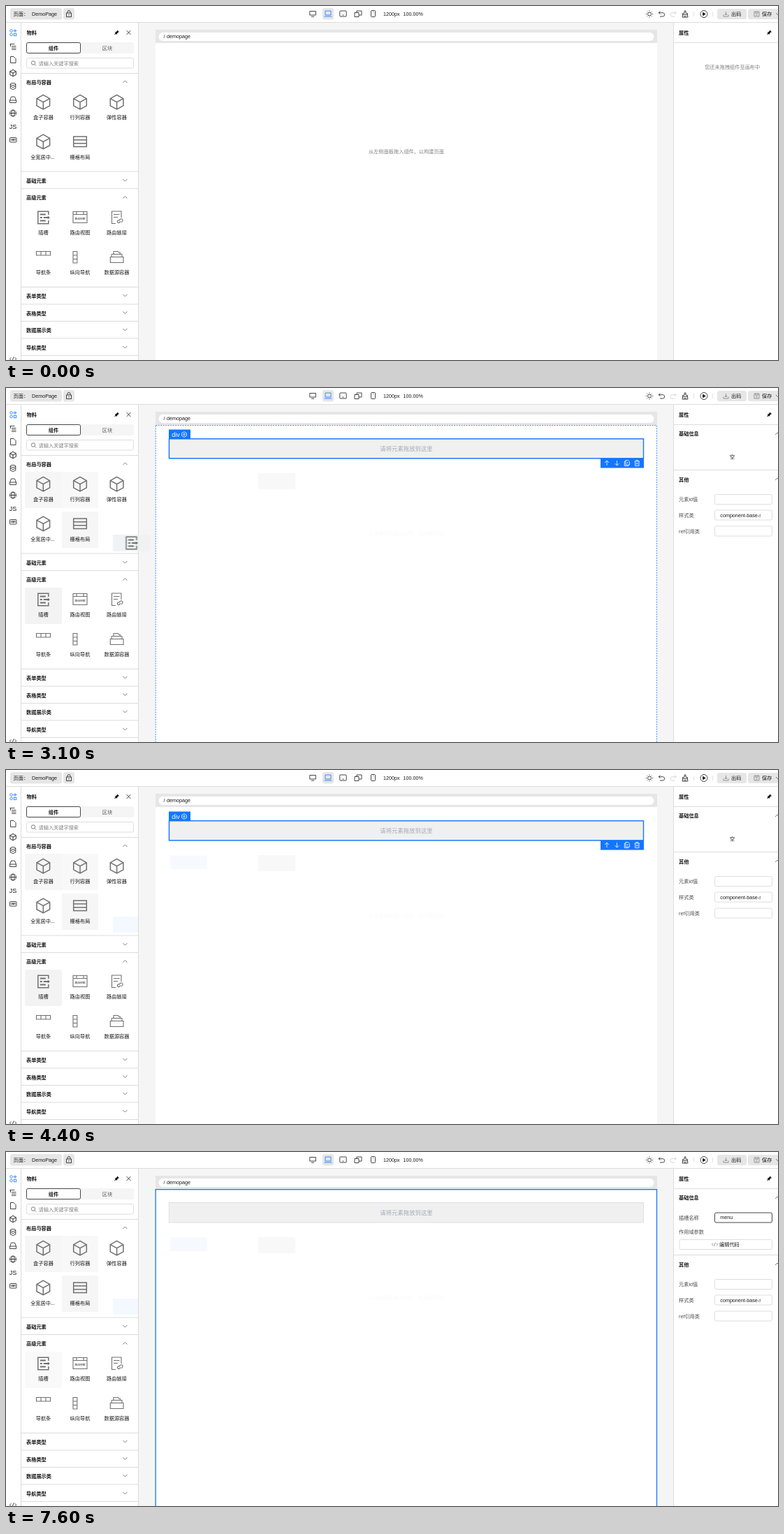
Write an HTML page that moves like this. It is 1105 px wide and 507 px high and loops after 8000 ms.

```html
<!DOCTYPE html>
<html lang="zh-CN">
<head>
<meta charset="utf-8">
<title>页面设计器</title>
<style>
html, body { margin: 0; width: 100%; height: 100%; overflow: hidden; background: #fff; }
svg.stage { display: block; width: 100%; height: 100%; }
text { font: 7.2px "Liberation Sans", "Noto Sans CJK SC", "Noto Sans CJK", sans-serif; fill: #191919; white-space: pre; }
.b text, text.b { font-weight: 700; }
.m text, text.m { text-anchor: middle; }
.soft text, text.soft { fill: #808080; }
.label text { fill: #4d4d4d; }
.white text, text.white { fill: #fff; }
.line { stroke: #191919; fill: none; stroke-width: .8; }
.tile { stroke: #707070; fill: none; stroke-width: 1.5; }
.thin { stroke-width: 1.1; }
.rule { stroke: #dcdcdc; fill: none; }
.box { fill: #fff; stroke: #d6d6d6; stroke-width: .8; }
.btn { fill: #e6e6e6; }
.blue { fill: #1476ff; }
.edge { fill: none; stroke: #1476ff; }
.dash { stroke-dasharray: 2 1.5; }
.chev { stroke: #707070; fill: none; stroke-width: .9; }

[class*="t-"] { animation: 8s step-end infinite; }
.t-empty { animation-name: empty; }
.t-hint { animation-name: hint; }
.t-box { animation-name: box; }
.t-row { animation-name: row; }
.t-pick { animation-name: pick; }
.t-slot { animation-name: slot; }
.t-added { animation-name: added; }
.t-sel { animation-name: sel; }
.t-full { animation-name: full; }
.t-into { animation-name: into; }
.t-bar { animation-name: bar; }
.t-under { animation-name: under; }
.t-near { animation-name: near; }
.t-done { animation-name: done; }
.t-shift { animation-name: shift; }
.t-drag1 { animation-name: drag1; }
.t-drag2 { animation-name: drag2; }
.t-focus { animation-name: focus; }
.t-caret { animation-name: caret; }
.t-k1 { animation-name: k1; }
.t-k2 { animation-name: k2; }
.t-k3 { animation-name: k3; }
.t-k4 { animation-name: k4; }

@keyframes empty { 0% { visibility: visible } 21.25%, 100% { visibility: hidden } }
@keyframes hint { 0% { opacity: 1 } 21.25%, 100% { opacity: .05 } }
@keyframes box { 0% { visibility: hidden } 6.25%, 100% { visibility: visible } }
@keyframes row { 0% { visibility: hidden } 12.5%, 100% { visibility: visible } }
@keyframes pick { 0% { visibility: hidden } 38.75%, 100% { visibility: visible } }
@keyframes slot { 0% { fill: #fff } 38.75% { fill: #f3f3f3 } 56.25%, 100% { fill: #f9f9f9 } }
@keyframes added { 0% { visibility: hidden } 21.25%, 100% { visibility: visible } }
@keyframes sel { 0% { visibility: hidden } 21.25% { visibility: visible } 56.25%, 100% { visibility: hidden } }
@keyframes full { 0% { visibility: hidden } 21.25% { visibility: visible } 42.5%, 100% { visibility: hidden } }
@keyframes into {
  0% { visibility: hidden } 42.5% { visibility: visible } 46.25% { visibility: hidden }
  62.5% { visibility: visible } 63.75%, 100% { visibility: hidden }
}
@keyframes bar { 0% { visibility: hidden } 42.5% { visibility: visible } 46.25%, 100% { visibility: hidden } }
@keyframes under { 0% { visibility: hidden } 46.25% { visibility: visible } 55%, 100% { visibility: hidden } }
@keyframes near { 0% { visibility: hidden } 42.5%, 100% { visibility: visible } }
@keyframes done { 0% { visibility: hidden } 56.25%, 100% { visibility: visible } }
@keyframes shift { 0% { transform: none } 56.25%, 100% { transform: translateY(30px) } }
@keyframes drag1 {
  0% { visibility: hidden }
  12.5% { visibility: visible; transform: translate(101px, 153px) }
  13.75% { visibility: visible; transform: translate(186px, 152px) }
  15% { visibility: visible; transform: translate(283px, 147px) }
  16.25% { visibility: visible; transform: translate(388px, 134px) }
  21.25%, 100% { visibility: hidden; transform: translate(388px, 134px) }
}
@keyframes drag2 {
  0% { visibility: hidden }
  38.75% { visibility: visible; transform: translate(179.5px, 222px) }
  40% { visibility: visible; transform: translate(214px, 184px) }
  41.25% { visibility: visible; transform: translate(242px, 154px) }
  42.5% { visibility: visible; transform: translate(261.5px, 131px) }
  43.75% { visibility: visible; transform: translate(270px, 119px) }
  45% { visibility: visible; transform: translate(276px, 108px) }
  46.25% { visibility: visible; transform: translate(281.5px, 100.5px) }
  47.5% { visibility: visible; transform: translate(285px, 96px) }
  48.75% { visibility: visible; transform: translate(287px, 94px) }
  55%, 100% { visibility: hidden; transform: translate(287px, 94px) }
}
@keyframes focus { 0% { stroke: #d6d6d6 } 67.5% { stroke: #a6a6a6 } 68.75% { stroke: #595959 } 70%, 100% { stroke: #191919 } }
@keyframes caret {
  0% { visibility: hidden; transform: none }
  70% { visibility: visible; transform: none }
  76.25% { visibility: hidden; transform: none }
  82.5% { visibility: visible; transform: none }
  85% { visibility: visible; transform: translateX(6px) }
  86.25% { visibility: visible; transform: translateX(10px) }
  87.5% { visibility: visible; transform: translateX(14px) }
  88.75% { visibility: visible; transform: translateX(18px) }
  95%, 100% { visibility: hidden; transform: translateX(18px) }
}
@keyframes k1 { 0% { visibility: hidden } 85%, 100% { visibility: visible } }
@keyframes k2 { 0% { visibility: hidden } 86.25%, 100% { visibility: visible } }
@keyframes k3 { 0% { visibility: hidden } 87.5%, 100% { visibility: visible } }
@keyframes k4 { 0% { visibility: hidden } 88.75%, 100% { visibility: visible } }
</style>
</head>
<body>
<svg class="stage" viewBox="0 0 1105 507">
  <defs>
    <path id="cube" d="M0-10.3L9.3-5V5.3L0 10.3L-9.3 5.3V-5ZM-9.3-5L0 0L9.3-5M0 0V10.3"/>
    <g id="slotIcon">
      <path d="M7.5-4V-8.8H-7.5V8.8H7.5V4"/>
      <path d="M-4.5-4.5H3.5M-4.5 0H-1.5M.5 0H8M-4.5 4.5H3.5" stroke-width="1.8"/>
      <path d="M6.5-2.5L9.5 0L6.5 2.5Z" fill="#707070" stroke="none"/>
    </g>
    <path id="down" d="M-3-1.5L0 1.5L3-1.5"/>
    <path id="up" d="M-3 1.5L0-1.5L3 1.5"/>
    <g id="pin"><path d="M.8-3.6L3.6-.8L2.2-.4L.6 1.2L.4 3L-3-.4L-1.2-.6L.4-2.2Z" fill="#111"/><path d="M-1-.8L-3.6 3.6L.8 1" fill="#111"/></g>
    <path id="code" d="M-2.6-2.2L-4.8 0L-2.6 2.2M2.6-2.2L4.8 0L2.6 2.2M1-3L-1 3"/>
    <rect id="field" x="1014.5" width="82" height="14" rx="2"/>
  </defs>

  <!-- page background -->
  <rect width="1105" height="507" fill="#fff"/>
  <rect x="190" y="23" width="765" height="484" fill="#f5f5f5"/>

  <!-- top bar -->
  <path class="rule" d="M0 23.5H1105"/>
  <g class="btn">
    <rect x="6" y="3" width="74" height="16.5" rx="3"/>
    <rect x="82" y="3" width="16" height="16.5" rx="3"/>
    <rect x="453" y="3" width="16" height="16.5" rx="3"/>
    <rect x="1018" y="4" width="42" height="15" rx="3"/>
    <rect x="1062" y="4" width="50" height="15" rx="3"/>
  </g>
  <text x="10.5" y="13.8">页面：</text><text x="37" y="13.8">DemoPage</text>
  <text x="540" y="13.8">1200px</text><text x="568.5" y="13.8">100.00%</text>
  <text x="1038" y="14.2">出码</text><text x="1082" y="14.2">保存</text>
  <g class="line">
    <path d="M86.5 10H93.5V15.5H86.5ZM88 10V8.5A2 2 0 0 1 92 8.5V10M90 12V13.5"/>
    <path d="M434.8 7.5H443.4V13H434.8ZM437 15.2H441.2"/>
    <path d="M457 7H465V13H457ZM455.5 15H466.5" stroke="#1476ff"/>
    <rect x="477.8" y="7" width="9.4" height="8" rx="1"/><path d="M481.5 13H483.5"/>
    <path d="M499 9.5H505V15.5H499ZM502 9.5V7H509V13H505"/>
    <rect x="522.5" y="6.5" width="6" height="9" rx="1"/><path d="M525 8.3H526"/>
    <circle cx="921" cy="11.5" r="2.5"/>
    <path d="M921 6.3V7.5M921 15.5V16.7M915.8 11.5H917M925 11.5H926.2M917.3 7.8L918.1 8.6M923.9 14.4L924.7 15.2M917.3 15.2L918.1 14.4M923.9 8.6L924.7 7.8"/>
    <path d="M936.5 7.5L934.3 9.7L936.5 11.9M934.3 9.7H940.5A2.7 2.7 0 0 1 940.5 15H936"/>
    <path d="M957 7.5L959.2 9.7L957 11.9M959.2 9.7H953A2.7 2.7 0 0 0 953 15H957.5" stroke="#ccc"/>
    <path d="M971 7H973V10.5H975.5V12.5H968.5V10.5H971ZM968.7 12.5L968 16H976L975.3 12.5M971 14V16M973 14V16"/>
    <circle cx="999" cy="11.5" r="5"/><path d="M997.5 9.3L1001.2 11.5L997.5 13.7Z" fill="#191919"/>
    <path d="M984.5 8V15M1011.5 8V15" stroke="#ddd"/>
    <path d="M1030.5 8V13M1028.5 11L1030.5 13L1032.5 11M1027 12.5V15H1034V12.5" stroke="#808080"/>
    <path d="M1071 8H1078V15H1071ZM1073 8V10.5H1076V8M1073 13H1076" stroke="#808080"/>
  </g>
  <use href="#down" class="chev" x="1105" y="11.5"/>

  <!-- icon rail -->
  <path class="rule" d="M21.5 24V507M189.5 24V507M955.5 24V507"/>
  <g class="line">
    <g stroke="#1476ff"><circle cx="7.5" cy="35.5" r="1.8"/><circle cx="7.5" cy="41" r="1.8"/><rect x="11.3" y="39.3" width="3.4" height="3.4"/><path d="M13 33V38M10.5 35.5H15.5"/></g>
    <path d="M5.5 54.5H12.5M8 57.5H14.5M8 60H14.5M8 62.3H14.5M6.5 54.5V58"/>
    <path d="M6.5 72.5H11L14 75.5V81.5H6.5Z"/>
    <use href="#cube" transform="translate(10 96) scale(.46)" stroke-width="2"/>
    <ellipse cx="10" cy="112" rx="3.8" ry="1.6"/><path d="M6.2 112V118Q10 121 13.8 118V112M6.2 115Q10 118 13.8 115"/>
    <path d="M7.5 130H12.5L14.5 135V138.5H5.5V135ZM5.5 135H14.5"/>
    <circle cx="10" cy="153.5" r="4.5"/><ellipse cx="10" cy="153.5" rx="2" ry="4.5"/><path d="M5.5 153.5H14.5"/>
    <rect x="5.5" y="188.5" width="9.5" height="6.5" rx="1"/>
    <use href="#code" x="10" y="505.5"/>
  </g>
  <text class="m" x="10" y="176.2" style="font-size:9px">JS</text>
  <text class="m b" x="10.2" y="193.2" style="font-size:3.6px">VAR</text>

  <!-- material panel -->
  <text class="b" x="29.5" y="40.7">物料</text>
  <use href="#pin" x="158.5" y="38"/>
  <path class="line" d="M172.5 35L178.5 41M178.5 35L172.5 41"/>
  <rect x="29" y="52" width="154" height="16" rx="2" fill="#f5f5f5"/>
  <rect x="29.5" y="52.5" width="77" height="15" rx="2" fill="#fff" stroke="#191919" stroke-width=".8"/>
  <text class="m b" x="68" y="62.7">组件</text>
  <text class="m" x="145" y="62.7" style="fill:#595959">区块</text>
  <rect class="box" x="29.5" y="74.5" width="153" height="14.5" rx="2"/>
  <circle class="chev" cx="39" cy="81.5" r="2.7"/><path class="chev" d="M41 83.5L43 85.5"/>
  <text class="soft" x="46.5" y="84.6">请输入关键字搜索</text>
  <path class="rule" d="M22 96.5H189M22 237H189M22 261.5H189M22 402.5H189M22 427H189M22 451.5H189M22 476H189M22 500.5H189"/>
  <g class="b">
    <text x="29" y="111.8">布局与容器</text><text x="29" y="252.8">基础元素</text><text x="29" y="277.3">高级元素</text>
    <text x="29" y="418">表单类型</text><text x="29" y="442.6">表格类型</text><text x="29" y="467">数据展示类</text><text x="29" y="491.6">导航类型</text>
  </g>
  <g class="chev">
    <use href="#up" x="170.5" y="108.5"/><use href="#down" x="170.5" y="249.5"/><use href="#up" x="170.5" y="274"/>
    <use href="#down" x="170.5" y="414.5"/><use href="#down" x="170.5" y="439"/><use href="#down" x="170.5" y="463.5"/><use href="#down" x="170.5" y="488.5"/>
  </g>
  <rect class="t-box" x="27" y="120" width="53" height="52" fill="#f6f6f6"/>
  <rect class="t-row" x="80" y="120" width="52" height="52" fill="#f8f8f8"/>
  <rect class="t-pick" x="80" y="177" width="52" height="52" fill="#f6f6f6"/>
  <rect class="t-slot" x="27" y="286" width="53" height="52" rx="2" fill="#fff"/>
  <rect class="t-pick" x="153" y="210" width="36" height="23" fill="#f4f8ff"/>
  <g class="tile">
    <use href="#cube" x="53.3" y="137.6"/><use href="#cube" x="106" y="137.6"/><use href="#cube" x="158.6" y="137.6"/>
    <use href="#cube" x="53.3" y="194.4"/>
    <path d="M96.7 187H115.3V201.5H96.7ZM96.7 191.8H115.3M96.7 196.7H115.3"/>
    <use href="#slotIcon" x="53.3" y="303"/>
    <path class="thin" d="M96 294.5H116V310.5H96ZM96 298.5H116M101 294.5V298.5M111 294.5V298.5"/>
    <path class="thin" d="M165 303V294H151.5V311.5H157M154 298.5H162.5M154 302.5H160M161.5 307.5L163.5 305.5A2 2 0 0 1 166.5 308.3L165 310M164 308.5L162 310.5A2 2 0 0 1 159.5 308L161 306.5"/>
    <path class="thin" d="M43.5 351.5H63.5V357H43.5ZM50 351.5V357M57 351.5V357"/>
    <path class="thin" d="M96 351.5H101.8V368H96ZM96 357H101.8M96 362.5H101.8"/>
    <path class="thin" d="M149.3 359.5H168V367.5H149.3ZM151.3 359.5V355.5H166V359.5M154 355.5V351.5H160L161.5 353H163.3V355.5"/>
  </g>
  <text class="m b" x="106" y="306.2" style="font-size:3.8px;fill:#707070">路由视图</text>
  <g class="m">
    <text x="53.5" y="161.8">盒子容器</text><text x="106" y="161.8">行列容器</text><text x="158.5" y="161.8">弹性容器</text>
    <text x="52.5" y="218.6">全宽居中...</text><text x="106" y="218.6">栅格布局</text>
    <text x="53.5" y="327.2">插槽</text><text x="106" y="327.2">路由视图</text><text x="158.5" y="327.2">路由链接</text>
    <text x="53.5" y="384.2">导航条</text><text x="106" y="384.2">纵向导航</text><text x="158.5" y="384.2">数据源容器</text>
  </g>

  <!-- canvas -->
  <rect x="214" y="34" width="718" height="19.5" fill="#e6e6e6"/>
  <rect x="218.5" y="38" width="709" height="12" rx="6" fill="#fff"/>
  <text x="225.5" y="46.3">/</text><text x="230" y="46.3">demopage</text>
  <rect x="214" y="53" width="718" height="454" fill="#fff"/>
  <text class="m soft t-hint" x="573" y="211.2">从左侧面板拖入组件，以构建页面</text>
  <rect class="t-added" x="361" y="122" width="53" height="23" fill="#f8f8f8"/>
  <rect class="t-near" x="235" y="122" width="53" height="20" fill="#f6faff"/>

  <g class="t-added">
    <rect x="233.3" y="72.5" width="679.2" height="28.5" fill="#f0f0f0" stroke="#dadada" stroke-width=".8"/>
    <text class="m" x="573" y="90.4" style="font-size:8.4px;fill:#a3acb8">请将元素拖放到这里</text>
  </g>
  <rect class="edge dash t-full" x="214.2" y="53.5" width="717.3" height="460" stroke-width=".8"/>
  <rect class="edge t-done" x="214.2" y="53.7" width="717.3" height="460" stroke-width="1.3"/>
  <g class="t-into">
    <rect class="edge dash" x="214.2" y="53.5" width="717.3" height="67" stroke-width=".8"/>
    <rect class="blue" x="872" y="122" width="60" height="10"/>
    <text class="white" x="873.7" y="129.8">拖放元素到容器内</text>
  </g>
  <rect class="blue t-bar" x="214" y="118.7" width="718" height="2.8"/>
  <g class="t-sel">
    <rect class="edge" x="233.5" y="72.8" width="679" height="28" stroke-width="1.4"/>
    <rect class="blue" x="233" y="59.5" width="31" height="13.5"/>
    <text class="white" x="237.3" y="69.6" style="font-size:9px">div</text>
    <rect class="blue" x="851" y="101" width="62" height="13.5"/>
    <g class="line" style="stroke:#fff">
      <path d="M251.6 64.6L255 62.7L258.4 64.6V68.4L255 70.3L251.6 68.4Z"/><circle cx="255" cy="66.5" r="1.2"/>
      <path d="M860 111V104M857 107L860 104L863 107M874.5 104V111M871.5 108L874.5 111L877.5 108"/>
      <path d="M887 103.5H890.5L892.5 105.5V110H887ZM887 105H885.3V111.5H891V110M888.5 107H891"/>
      <path d="M899.5 105H907M902 105V103.5H904.5V105M900.5 105V111.5H906V105M902.4 107V109.7M904.2 107V109.7"/>
    </g>
  </g>
  <rect class="blue t-under" x="233" y="99.5" width="680" height="2.8"/>

  <!-- properties panel -->
  <text class="b" x="963" y="40.7">属性</text>
  <use href="#pin" x="1092.5" y="38"/>
  <path class="rule" d="M956 52.5H1105"/>
  <text class="m soft t-empty" x="1039.7" y="90.2">您还未拖拽组件至画布中</text>
  <g class="t-added">
    <text class="b" x="963" y="68.3">基础信息</text>
    <use href="#up" class="chev" x="1104" y="65.5"/>
  </g>
  <text class="m t-sel" x="1039.7" y="100.8">空</text>
  <g class="t-shift"><g class="t-added">
    <path class="rule" d="M956 117.5H1105"/>
    <text class="b" x="963" y="133.8">其他</text>
    <use href="#up" class="chev" x="1104" y="130.5"/>
    <g class="label">
      <text x="963" y="162">元素id值</text><text x="963" y="184.8">样式类</text><text x="963" y="207.6">ref引用类</text>
    </g>
    <use href="#field" class="box" y="152.5"/><use href="#field" class="box" y="175"/><use href="#field" class="box" y="198"/>
    <svg x="1022" y="175" width="58" height="14"><text x=".3" y="9.6">component-base-style</text></svg>
  </g></g>
  <g class="t-done">
    <g class="label"><text x="963" y="96.5">插槽名称</text><text x="963" y="117">作用域参数</text></g>
    <use href="#field" class="box t-focus" y="87"/>
    <rect class="box" x="964" y="125.5" width="132.5" height="14" rx="2"/>
    <use href="#code" class="chev" transform="translate(1014.5 132.3) scale(.85)"/>
    <text x="1021" y="135.2">编辑代码</text>
  </g>
  <text x="1022.3" y="96.4"><tspan class="t-k1">m</tspan><tspan class="t-k2">e</tspan><tspan class="t-k3">n</tspan><tspan class="t-k4">u</tspan></text>
  <rect class="t-caret" x="1022" y="90" width="1" height="8" fill="#191919"/>

  <!-- dragged tiles -->
  <g class="t-drag1"><rect x="-26.5" y="-12" width="53" height="24" fill="#f0f0f0" opacity=".6"/><use href="#cube" class="tile"/></g>
  <g class="t-drag2"><rect x="-26.5" y="-12" width="53" height="24" fill="#f0f0f0" opacity=".7"/><use href="#slotIcon" class="tile"/></g>
</svg>
</body>
</html>
```
